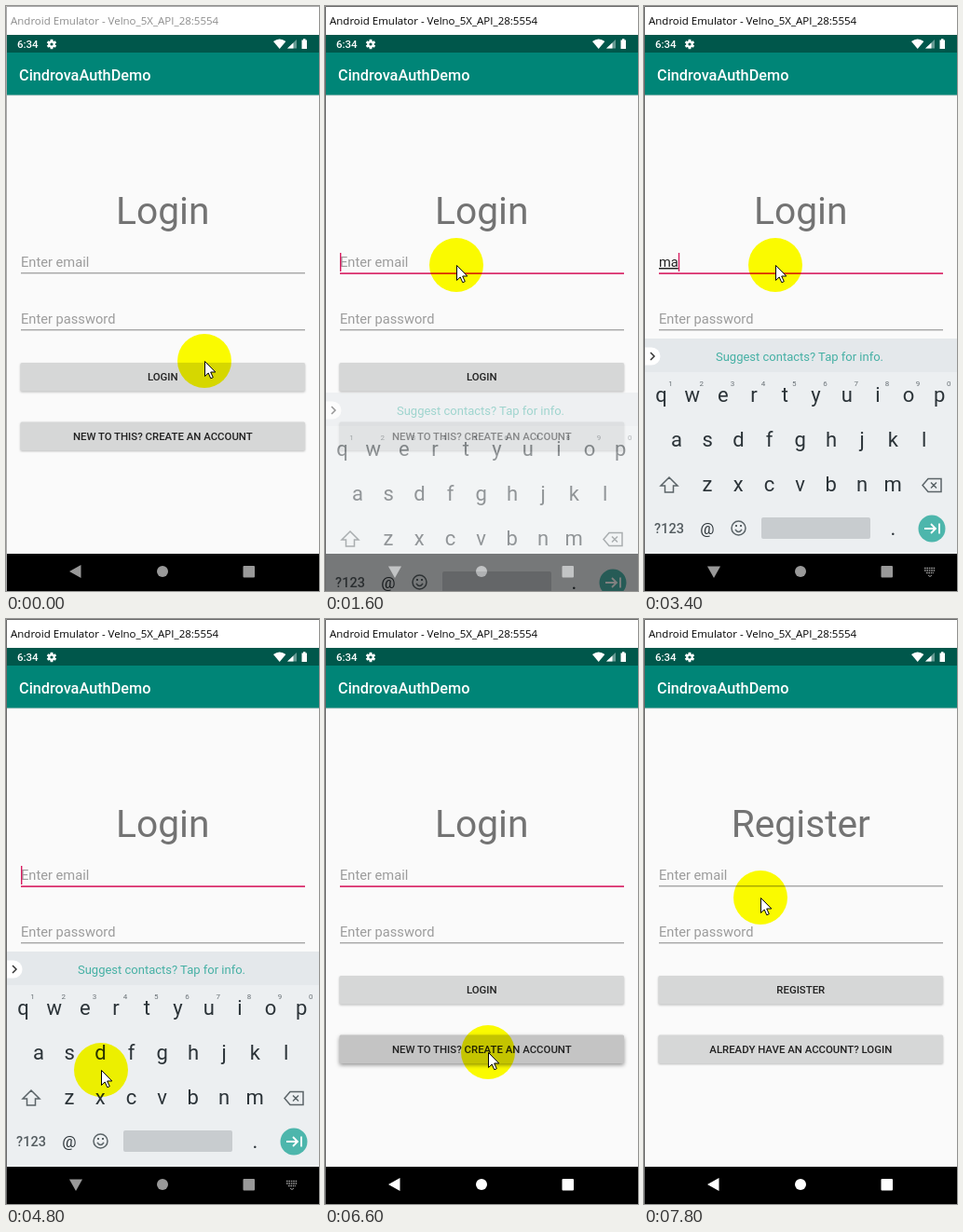
An HTML page that plays this animation: 336 by 628 pixels, repeating every 8 s.

```html
<!DOCTYPE html>
<html lang="en">
<head>
<meta charset="utf-8">
<title>Login demo</title>
<style>
  html, body { margin: 0; height: 100%; overflow: hidden; background: #fff; }
  svg { display: block; width: 100vw; height: 100vh; font-family: Roboto, sans-serif; }
  .mid { text-anchor: middle; }
  .bold { font-weight: 500; }
  .hint { font-size: 14.67px; fill: #9c9c9c; }
  .btn { fill: #d6d7d7; filter: drop-shadow(0 1px 1px rgba(0,0,0,.25)); }
  .btn.down { fill: #c4c4c4; filter: drop-shadow(0 2px 2px rgba(0,0,0,.4)); }
  .label { font-size: 11.4px; fill: #212121; }
  .key { font-size: 22px; fill: #2b3338; }
  .icon { fill: none; stroke: #5b6468; stroke-width: 1.5; }
  #halo { mix-blend-mode: multiply; }
</style>
</head>
<body>
<svg id="stage" viewBox="0 0 336 628"></svg>
<script>
const STEP = 200, LOOP = 8000;
const stage = document.getElementById('stage');
const $ = id => document.getElementById(id);

const rect = (x, y, w, h, fill, more = '') =>
  `<rect x="${x}" y="${y}" width="${w}" height="${h}" fill="${fill}" ${more}/>`;
const text = (x, y, s, cls, more = '') =>
  `<text x="${x}" y="${y}" class="${cls}" ${more}>${s}</text>`;

const button = (y, label, id) =>
  `<rect id="${id}" class="btn" x="15.5" y="${y}" width="305.5" height="30.5" rx="1.5"/>` +
  text(168.3, y + 19.3, label, 'mid bold label');

// One app window: bars, heading, two fields and two buttons
const app = (id, heading, first, second) =>
  rect(1, 31, 335, 557, '#fafafa') +
  rect(1, 31, 335, 19, '#00574b') +
  rect(1, 95, 335, 2, 'url(#fade)') +
  rect(1, 50, 335, 45.5, '#008577') +
  text(14, 79.5, 'CindrovaAuthDemo', 'bold', 'font-size="16.3" fill="#fff"') +
  text(168.3, 234, heading, 'mid', 'font-size="40.75" fill="#737373"') +
  text(16, 280, 'Enter email', 'hint', `id="${id}Hint"`) +
  rect(16, 286.3, 305, 1, '#858585', `id="${id}Line"`) +
  text(16, 341, 'Enter password', 'hint') +
  rect(16, 347.3, 305, 1, '#858585') +
  button(383, first, id + 'First') + button(446.5, second, id + 'Second');

const keyRow = (letters, x, y) => [...letters].map((c, i) =>
  text(x + i * 33.2, y, c, 'mid key')).join('');
const digits = [...'1234567890'].map((c, i) =>
  text(28.5 + i * 33.2, 408, c, 'mid', 'font-size="8" fill="#697176"')).join('');

const keyboard =
  rect(1, 357, 335, 231, '#eceff1') + rect(1, 357, 335, 36, '#e4e8eb') +
  '<path d="M1 366.5H8a9.5 9.5 0 0 1 0 19H1Z" fill="#fff"/>' +
  '<path d="M7 372l4 4-4 4" class="icon" style="stroke:#333"/>' +
  text(167, 381, 'Suggest contacts? Tap for info.', 'mid', 'font-size="13" fill="#45b0a4"') +
  digits + keyRow('qwertyuiop', 18.5, 424.5) +
  keyRow('asdfghjkl', 35, 472.5) + keyRow('zxcvbnm', 68, 520.5) +
  '<path d="M27 506l9 9h-4.5v7h-9v-7H18Z" class="icon"/>' +
  '<path d="M305 507.500h14v14h-14l-6-7Zm3 4l6 6m0-6l-6 6" class="icon"/>' +
  text(27, 566, '?123', 'mid bold', 'font-size="14.500" fill="#545c60"') +
  text(68, 567, '@', 'mid', 'font-size="17" fill="#2b3338"') +
  '<circle cx="101.500" cy="560.500" r="7.500" class="icon"/>' +
  '<path d="M98 562q3.500 5 7 0" class="icon"/>' +
  '<path d="M98 557h2v2h-2zM103 557h2v2h-2z" fill="#5b6468"/>' +
  rect(126, 549, 117, 23, '#c8cccf', 'rx="2"') + text(267.5, 567.5, '.', 'mid key') +
  '<circle cx="309" cy="561" r="14.500" fill="#4db6ac"/>' +
  '<path d="M301 561h12m-5-5l5 5-5 5M317 555.500v11" class="icon" style="stroke:#fff;stroke-width:1.800"/>';

const gear = [0, 60, 120].map(a =>
  rect(47.6, 35.8, 2.8, 10.4, '#fff', `transform="rotate(${a} 49 41)"`)).join('');

const statusIcons =
  text(12, 45, '6:34', 'bold', 'font-size="11.500" fill="#fff"') + gear +
  '<circle cx="49" cy="41" r="2.700" fill="#00574b" stroke="#fff" stroke-width="2.200"/>' +
  '<path d="M287 38q6.700-5 13.400 0L293.700 46Z" fill="#fff"/>' +
  '<path d="M312 36v9.500h-10Z" fill="#fff" opacity=".4"/><path d="M308.500 39.500v6H302Z" fill="#fff"/>' +
  '<path d="M317.500 36.500h1.500v-1.300h2.500v1.300h1.500v9.500h-5.500Z" fill="#fff"/>';

const nav =
  rect(1, 588, 335, 40, '#000') +
  rect(34, 588, 83, 40, '#1c1c1c', 'id="ripple" rx="20"') +
  '<g id="navIcons"><path id="back"/><circle cx="168" cy="607" r="6"/>' +
  '<rect x="254.500" y="601" width="12.500" height="12.500" rx="1"/></g>' +
  '<g id="imeIcon" fill="none" stroke="#999"><path d="M301 603.500h12M301 606h12M303 608.500h8" ' +
  'stroke-width="1.500" stroke-dasharray="1.600 .8"/><path d="M305 611l2 1.500 2-1.500"/></g>';

stage.innerHTML =
  `<defs><linearGradient id="fade" x2="0" y2="1"><stop stop-color="#c4c8c8"/>
   <stop offset="1" stop-color="#fafafa"/></linearGradient>
   <clipPath id="reveal"><rect id="revealBox" x="1" width="335" height="628"/></clipPath></defs>` +
  rect(0, 0, 336, 628, '#fff') +
  `<g id="login">${app('login', 'Login', 'LOGIN', 'NEW TO THIS? CREATE AN ACCOUNT')}
   ${text(16, 280, '', '', 'id="typed" font-size="14.670" fill="#222" text-decoration="underline"')}
   ${rect(16, 265, 1.4, 20, '#d81b60', 'id="caret"')}</g>` +
  rect(1, 31, 335, 557, '#000', 'id="dim"') + nav +
  `<g id="keyboard">${keyboard}</g>
   <g id="register" clip-path="url(#reveal)"><g id="slide">
   ${app('reg', 'Register', 'REGISTER', 'ALREADY HAVE AN ACCOUNT? LOGIN')}</g></g>` +
  statusIcons + rect(0, 0, 336, 31, '#fff') +
  text(5, 20, 'Android Emulator - Velno_5X_API_28:5554', '',
    'id="caption" font-size="11.500" font-family="Open Sans, sans-serif"') +
  '<path id="frame" d="M336 .5H.5V628" fill="none"/>' +
  `<g id="pointer"><circle id="halo" r="29" fill="#ff0"/>
   <path d="M.5 .5V16.500L4.200 13L6.800 18.800L9.300 17.700L6.700 12H11.800Z" fill="#fff" stroke="#000"/></g>`;

// Pointer way points: time, x, y
const path = [
  [0, 213, 381], [200, 217, 391], [400, 219, 396], [800, 175, 318], [1000, 149, 286],
  [1200, 141, 278], [4200, 141, 278], [4600, 124, 380], [5000, 80, 588], [5200, 75, 606],
  [5400, 75, 606], [5600, 97, 553.5], [6000, 150, 484], [6200, 170, 468], [6400, 175, 465],
  [7200, 175, 465], [7400, 165, 430], [7600, 138, 340], [7800, 125, 299], [8000, 125, 299]
];
const typing = [[0, ''], [2400, 'm'], [2600, 'ma'], [3200, 'man'], [3400, 'ma'], [3800, 'm'], [4000, '']];

function along(t) {
  const i = Math.max(1, path.findIndex(p => p[0] >= t));
  const [t0, x0, y0] = path[i - 1], [t1, x1, y1] = path[i];
  const k = (t - t0) / (t1 - t0);
  return [x0 + (x1 - x0) * k, y0 + (y1 - y0) * k];
}

function set(id, attrs) {
  for (const name in attrs) $(id).setAttribute(name, attrs[name]);
}
const show = (id, on) => set(id, { visibility: on ? 'visible' : 'hidden' });

function draw(t) {
  const active = t >= 1400, closed = t >= 5400;
  set('caption', { fill: active ? '#000' : '#8c8c8c' });
  set('frame', { stroke: active ? '#6a6a6a' : '#a8a8a8' });
  set('pointer', { transform: `translate(${along(t)})` });

  // Email field
  const word = typing.filter(e => e[0] <= t).pop()[1];
  $('typed').textContent = word;
  show('loginHint', !word);
  set('caret', { x: 16 + (word ? $('typed').getComputedTextLength() : 0) });
  show('caret', active && t < 5600);
  set('loginLine', { fill: active ? '#d81b60' : '#858585', height: active ? 1.6 : 1 });
  $('loginSecond').classList.toggle('down', t >= 6600);

  // Keyboard and navigation bar
  const rise = t < 1800 ? 0.5 : t < 2000 ? 0.95 : 1;
  show('keyboard', t >= 1600 && t < 5600);
  set('keyboard', { transform: `translate(0 ${Math.round(116 * (1 - rise))})`, opacity: rise });
  show('imeIcon', t >= 1800 && !closed);
  show('ripple', t === 5400 || t === 5600);
  set('navIcons', { fill: closed ? '#fff' : '#999' });
  set('back', { d: active && !closed ? 'M68 601.500H82L75 614Z' : 'M80.500 600V614L68 607Z' });

  // The register window slides up and is revealed from below
  const [drop, top, lift, shade] =
    t < 7000 ? [0, 628, 0, 0] : t < 7200 ? [26, 540, 1, 0.03] :
    t < 7400 ? [14, 125, 5, 0.11] : [0, 31, 0, 0];
  show('register', t >= 7000);
  set('slide', { transform: `translate(0 ${drop})` });
  set('revealBox', { y: top });
  set('login', { transform: `translate(0 ${-lift})` });
  set('dim', { opacity: shade });
}

const start = performance.now();
function tick() {
  const t = (performance.now() - start) % LOOP;
  draw(Math.floor(t / STEP) * STEP);
  requestAnimationFrame(tick);
}
tick();
</script>
</body>
</html>
```
